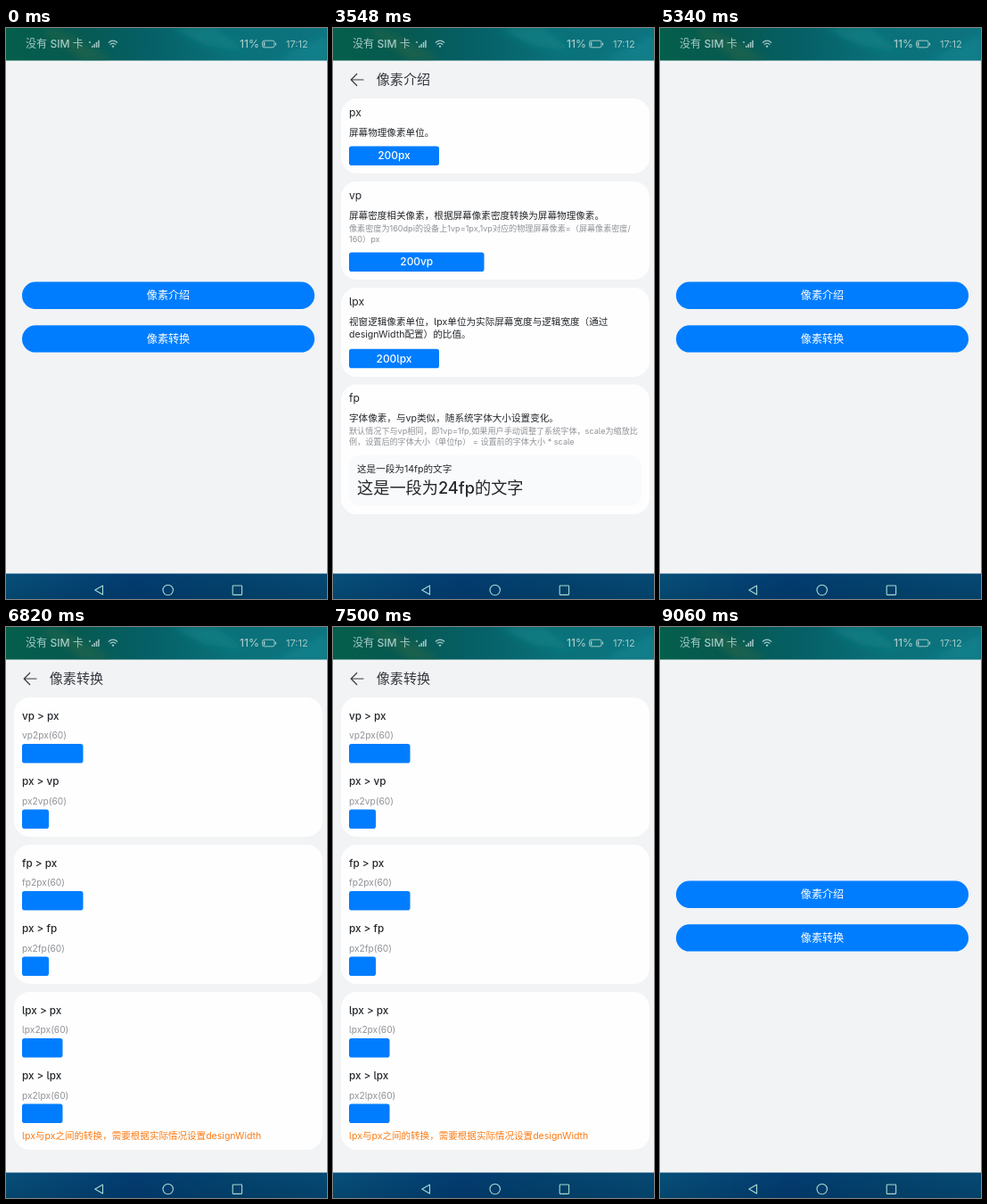
Recreate the animation shown at these times as an HTML page. Size 360 by 640 pixels, loop 9930 ms.

```html
<!DOCTYPE html>
<html lang="zh-CN">
<head>
<meta charset="utf-8">
<title>像素单位</title>
<style>
html, body { margin: 0; width: 100%; height: 100%; overflow: hidden; background: #f1f3f5; }
svg { display: block; width: 100vw; height: 100vh; }
text { font-family: Inter, "Noto Sans CJK SC", "Noto Sans CJK", sans-serif; font-feature-settings: "cv05"; white-space: pre; }
</style>
</head>
<body>
<svg id="stage" viewBox="0 0 360 640" xmlns="http://www.w3.org/2000/svg">
  <defs>
    <linearGradient id="top">
      <stop offset="0" stop-color="#045f4b"/>
      <stop offset=".22" stop-color="#075951"/>
      <stop offset=".45" stop-color="#056067"/>
      <stop offset=".7" stop-color="#0a7179"/>
      <stop offset="1" stop-color="#0d7480"/>
    </linearGradient>
    <linearGradient id="bottom">
      <stop offset="0" stop-color="#07507a"/>
      <stop offset=".4" stop-color="#033c72"/>
      <stop offset=".7" stop-color="#04446f"/>
      <stop offset="1" stop-color="#064a74"/>
    </linearGradient>
    <linearGradient id="shade" x2="0" y2="1">
      <stop offset="0" stop-color="#002c4c" stop-opacity="0"/>
      <stop offset="1" stop-color="#002c4c" stop-opacity=".3"/>
    </linearGradient>
    <filter id="soft" x="-30%" y="-60%" width="160%" height="220%"><feGaussianBlur stdDeviation="4"/></filter>
    <clipPath id="topClip"><rect width="360" height="36.5"/></clipPath>
  </defs>
  <rect width="360" height="640" fill="#f1f3f5"/>
  <g id="home"></g>
  <g id="intro"></g>
  <g id="convert"></g>
  <g clip-path="url(#topClip)">
    <rect width="360" height="37" fill="url(#top)"/>
    <g filter="url(#soft)">
      <path d="M50 0Q85 12 120 37H85Q65 18 40 5Z" fill="#2d6848" opacity=".55"/>
      <path d="M185 0H235L270 26L225 20Z" fill="#16858a" opacity=".6"/>
      <path d="M300 37L360 8V37Z" fill="#1c8b94" opacity=".5"/>
    </g>
  </g>
  <g id="status"></g>
  <rect y="611.5" width="360" height="29" fill="url(#bottom)"/>
  <rect y="611.5" width="360" height="29" fill="url(#shade)"/>
  <g fill="none" stroke="#a5dcd2" stroke-width="1.1" stroke-linejoin="round">
    <path d="M99.8 630L108.5 625V635Z"/>
    <circle cx="181.7" cy="630" r="5.7"/>
    <rect x="254.2" y="625" width="10.4" height="10.4" rx=".8"/>
  </g>
</svg>
<script>
const NS = 'http://www.w3.org/2000/svg';
const $ = id => document.getElementById(id);
const BLUE = '#007dff', INK = '#24272b', GREY = '#8f9297', PALE = '#a4c9c7';

function add(parent, tag, attrs, content) {
  const el = document.createElementNS(NS, tag);
  for (const key in attrs) el.setAttribute(key, attrs[key]);
  if (content) el.textContent = content;
  parent.appendChild(el);
  return el;
}

const text = (g, x, y, size, content, fill = INK, weight = 400, anchor = 'start') =>
  add(g, 'text', { x, y, 'font-size': size, fill, 'font-weight': weight, 'text-anchor': anchor }, content);
const box = (g, x, y, width, height, rx, fill) => add(g, 'rect', { x, y, width, height, rx, fill });
const line = (g, d, stroke, width) =>
  add(g, 'path', { d, stroke, 'stroke-width': width, fill: 'none', 'stroke-linecap': 'round', 'stroke-linejoin': 'round' });
const card = (g, top, bottom) => box(g, 9, top, 346, bottom - top, 18, '#fefefe');

function header(g, title) {
  line(g, 'M34 58H20.5M26.7 51.5L20.2 58L26.7 64.5', '#3b3e43', 1.2);
  text(g, 48.7, 63.4, 15.1, title, '#34373c', 500);
}

function bar(g, y, width, label) {
  box(g, 18, y, width, 21.5, 2.8, BLUE);
  if (label) text(g, 18 + width / 2, y + 14.8, 11.9, label, '#fff', 500, 'middle');
}

function drawStatus(g) {
  text(g, 22, 22.3, 12.1, '没有 SIM 卡', PALE, 500);
  for (let i = 0; i < 4; i++) box(g, 96 + i * 2.4, 19.8 - i * 2, 1.5, 2.2 + i * 2, .4, PALE);
  line(g, 'M93.2 15.2L94.6 16.6M94.6 15.2L93.2 16.6', PALE, .8);
  line(g, 'M115.2 16.2Q120 12 124.8 16.2M117 18.4Q120 15.8 123 18.4', PALE, 1.2);
  add(g, 'circle', { cx: 120, cy: 20.6, r: 1.2, fill: PALE });
  text(g, 262, 22.3, 12.1, '11%', PALE, 500);
  add(g, 'rect', { x: 287.6, y: 14.2, width: 13.4, height: 7.6, rx: 2, fill: 'none', stroke: PALE, 'stroke-width': 1 });
  box(g, 288.8, 15.4, 1.6, 5.2, .6, PALE);
  box(g, 301.9, 16.4, 1.2, 3.2, .5, PALE);
  text(g, 314, 21.9, 11, '17:12', PALE);
}

function drawHome(g) {
  ['像素介绍', '像素转换'].forEach((label, i) => {
    const y = 284.5 + i * 48.7;
    box(g, 18, y, 328, 30.4, 15.2, BLUE);
    text(g, 182, y + 19.6, 12.1, label, '#fff', 500, 'middle');
  });
}

function drawIntro(g) {
  const title = (y, s) => text(g, 18, y, 12.1, s);
  const body = (y, s) => text(g, 18, y, 10.6, s);
  const note = (y, s) => text(g, 18, y, 9.1, s, GREY);
  header(g, '像素介绍');

  card(g, 79, 163);
  title(99, 'px');
  body(121, '屏幕物理像素单位。');
  bar(g, 132.5, 101, '200px');

  card(g, 172, 282);
  title(192, 'vp');
  body(213.7, '屏幕密度相关像素，根据屏幕像素密度转换为屏幕物理像素。');
  note(227.7, '像素密度为160dpi的设备上1vp=1px,1vp对应的物理屏幕像素=（屏幕像素密度/');
  note(240, '160）px');
  bar(g, 251.5, 151.5, '200vp');

  card(g, 291, 391);
  title(311, 'lpx');
  body(332.7, '视窗逻辑像素单位，lpx单位为实际屏幕宽度与逻辑宽度（通过');
  body(347.3, 'designWidth配置）的比值。');
  bar(g, 359.7, 101, '200lpx');

  card(g, 399.5, 545);
  title(419.3, 'fp');
  body(441, '字体像素，与vp类似，随系统字体大小设置变化。');
  note(455, '默认情况下与vp相同，即1vp=1fp,如果用户手动调整了系统字体，scale为缩放比');
  note(467.3, '例，设置后的字体大小（单位fp） = 设置前的字体大小 * scale');
  box(g, 18, 479, 328, 56.5, 12, '#f9fafb');
  text(g, 27, 497.6, 10.6, '这是一段为14fp的文字');
  text(g, 27, 522, 18.2, '这是一段为24fp的文字', INK, 500);
}

function drawConvert(g) {
  header(g, '像素转换');
  [['vp', 68.5, 30], ['fp', 68.5, 30], ['lpx', 45.5, 45.5]].forEach(([unit, wide, narrow], i) => {
    const top = 79 + i * 165;
    card(g, top, i < 2 ? top + 156 : 586);
    [[unit, 'px', wide], ['px', unit, narrow]].forEach(([from, to, width], j) => {
      const y = top + j * 73.6;
      text(g, 18, y + 24.7, 11.7, `${from} > ${to}`, INK, 500);
      text(g, 18, y + 46, 10.2, `${from}2${to}(60)`, GREY);
      bar(g, y + 52, width);
    });
  });
  text(g, 18, 574.3, 10.55, 'lpx与px之间的转换，需要根据实际情况设置designWidth', '#fb7b14');
}

const LOOP = 9930;
const pages = ['home', 'intro', 'convert'].map($);
const cues = [[0, 'home'], [860, 'intro'], [5340, 'home'], [6820, 'convert'], [9060, 'home']];

function render(ms) {
  const t = ms % LOOP;
  const current = cues.filter(([start]) => t >= start).pop()[1];
  for (const page of pages) page.style.display = page.id === current ? '' : 'none';
}

drawStatus($('status'));
drawHome($('home'));
drawIntro($('intro'));
drawConvert($('convert'));

const begin = performance.now();
function tick() {
  render(performance.now() - begin);
  requestAnimationFrame(tick);
}
tick();
</script>
</body>
</html>
```
